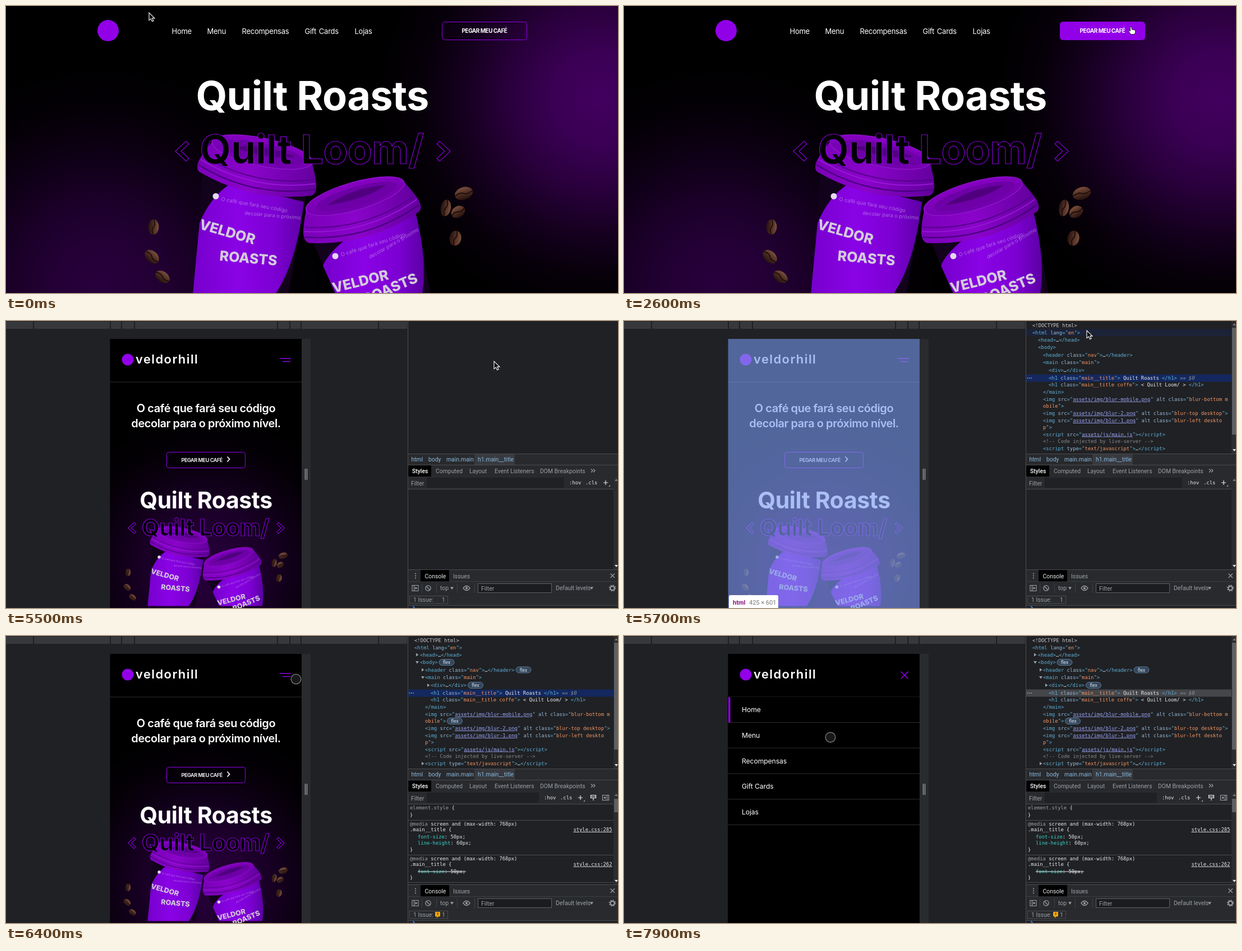
An HTML page for the animation above (8000 ms loop, 1091x513 px).

```html
<!DOCTYPE html>
<html lang="pt">
<head>
<meta charset="utf-8">
<title>Quilt Roasts</title>
<style>
html, body { margin: 0; width: 100%; height: 100%; overflow: hidden; background: #000; }
svg { display: block; width: 1091px; height: 513px; }
text { font-family: Inter, sans-serif; white-space: pre; }
.r { font-family: Roboto, sans-serif; }
.m { font-family: "DejaVu Sans Mono", monospace; }
.mid { text-anchor: middle; }
.big { font-weight: 700; letter-spacing: -.01em; text-anchor: middle; }
.nav { letter-spacing: -.25px; word-spacing: 1.5px; }
.line { fill: #000; stroke: #8500d6; stroke-width: 1.2px; vector-effect: non-scaling-stroke; }
</style>
</head>
<body>
<svg id="stage" viewBox="0 0 1091 513"></svg>
<script>
const LOOP = 8000, STEP = 100;
const PURPLE = '#9200e8', TAG = '#5db0d7', ATTR = '#9bbbdc', VALUE = '#f29766', LINK = '#9aa5f5';
const GREY = '#9aa0a6', LIGHT = '#e8eaed', RULE = '#494c50';
const TITLE = 'Quilt Roasts', CODE = 'Quilt Loom/', BRAND = 'veldorhill';

const esc = s => s.replace(/&/g, '&amp;').replace(/</g, '&lt;').replace(/>/g, '&gt;');
const rect = (x, y, w, h, fill, more = '') =>
  `<rect x="${x}" y="${y}" width="${w}" height="${h}" fill="${fill}" ${more}/>`;
const rich = (x, y, size, fill, body, more = '') =>
  `<text x="${x}" y="${y}" font-size="${size}" fill="${fill}" ${more}>${body}</text>`;
const text = (x, y, size, fill, s, more) => rich(x, y, size, fill, esc(s), more);
const path = (d, fill, more = '') => `<path d="${d}" fill="${fill}" ${more}/>`;
const stroke = (d, colour, w = 1, more = '') =>
  path(d, 'none', `stroke="${colour}" stroke-width="${w}" ${more}`);
const dot = (x, y, r, fill, more = '') => `<circle cx="${x}" cy="${y}" r="${r}" fill="${fill}" ${more}/>`;
const move = (tf, body) => `<g transform="${tf}">${body}</g>`;
const during = (from, to, body) => `<g data-from="${from}" data-to="${to}">${body}</g>`;
const fades = stops => stops.map(([at, c, a = 1]) =>
  `<stop offset="${at}" stop-color="${c}" stop-opacity="${a}"/>`).join('');
const linear = (id, stops, dir = '') => `<linearGradient id="${id}" ${dir}>${fades(stops)}</linearGradient>`;
// Soft round light with a bell-shaped falloff
const glow = (id, x, y, r, colour) =>
  `<radialGradient id="${id}" gradientUnits="userSpaceOnUse" cx="${x}" cy="${y}" r="${r}">${
    fades([0, .2, .4, .6, .8, 1].map(p => [p, colour, (Math.cos(Math.PI * p) + 1) / 2]))}</radialGradient>`;

const defs = `<defs>
  ${glow('glowR', 1060, 165, 400, '#41005e')}
  ${glow('glowL', 170, 500, 400, '#28003c')}
  ${glow('glowM', 356, 440, 280, '#260039')}
  ${linear('lid', [[0, '#7a00b8'], [.45, '#8a04ca'], [1, '#62009c']])}
  ${linear('top', [[0, '#8600c2'], [1, '#7000ac']], 'x2="0" y2="1"')}
  ${linear('panel', [[0, '#7600cc'], [.4, '#8a03e6'], [.75, '#7c00d2'], [1, '#5c00a4']])}
  ${linear('bean', [[0, '#7b4f3d'], [.5, '#4d2d22'], [1, '#24120e']], 'x2="0" y2="1"')}
  <clipPath id="phone">${rect(185.5, 32, 341.5, 481, '#000')}</clipPath>
</defs>`;

// Cups and beans
const lid = (x, y, turn) => move(`translate(${x} ${y}) rotate(${turn})`,
  path('M-107 -8Q-110 8 -102 12Q0 46 102 12Q110 8 107 -8Q103 -22 91 -46H-91Q-103 -22 -107 -8Z', 'url(#lid)') +
  stroke('M-106 0Q0 38 106 0', '#4c0080', 2.5) +
  stroke('M-104 -10Q0 26 104 -10', '#9616d6', 2) +
  stroke('M-101 -17Q0 18 101 -17', '#56008c', 2) +
  '<ellipse cy="-46" rx="91" ry="25" fill="url(#top)" stroke="#9418d0" stroke-width="1.2"/>' +
  '<ellipse cx="2" cy="-45" rx="75" ry="17" fill="#6d00a6"/>' +
  path('M-52 -44Q0 -62 58 -50Q20 -35 -52 -44Z', '#50007f'));
const print = (x, y, turn, size, s, heavy) => text(0, 0, size, heavy ? '#d3cbdc' : '#c9a8e8', s,
  `font-weight="${heavy ? 800 : 400}" opacity="${heavy ? 1 : .6}" transform="translate(${x} ${y}) rotate(${turn})"`);
const bean = (x, y, rx, ry, turn) => move(`translate(${x} ${y}) rotate(${turn})`,
  `<ellipse rx="${rx}" ry="${ry}" fill="url(#bean)"/>` +
  stroke(`M${-rx} 0Q${-rx / 3} -4 0 0T${rx} 0`, '#1c0c09', 1.8));
const cups =
  path('M350 296L333 515H503L536 335Z', '#12021c') +
  path('M400 318Q365 340 345 388L333 515H480Q518 460 531 350Z', 'url(#panel)') +
  lid(447, 306, 12) + dot(374, 340, 5.5, '#e4d8ee') +
  print(383, 348, 10, 9.4, 'O café que fará seu código') +
  print(425, 373, 5, 9.2, 'decolar para o próximo') +
  print(343, 398, 16, 25, 'VELDOR', 1) + print(380, 455, 5, 25, 'ROASTS', 1) +
  path('M546 418L586 515H757L729 360Z', '#12021c') +
  path('M612 412Q575 440 565 464L588 515H742Q752 450 728 362Z', 'url(#panel)') +
  lid(635, 384, -16) + dot(587, 447, 5.5, '#e4d8ee') +
  print(598, 448, -18, 9.4, 'O café que fará seu código') +
  print(649, 452, -30, 9.2, 'decolar para o próximo') +
  print(584, 513, -14, 25, 'VELDOR', 1) + print(641, 533, -23, 25, 'ROASTS', 1) +
  bean(263, 395, 13.5, 9.5, 92) + bean(260, 448, 14.5, 10, 42) + bean(279, 484, 14, 9.5, 36) +
  bean(816, 335, 16.5, 11, -18) + bean(784, 361, 15, 9, 100) +
  bean(806, 368, 13, 10, -32) + bean(801, 415, 13.5, 10.5, 100);

const chevron = (x, y, dir, k = 1) => path('M-12 0L7 -18L12 -13L-2 0L12 13L7 18Z', '#000',
  `class="line" transform="translate(${x} ${y}) scale(${k * dir} ${k})"`);

// Wide landing page
const links = [['Home', 296, 330], ['Menu', 359, 392], ['Recompensas', 421, 504],
  ['Gift Cards', 533, 593], ['Lojas', 622, 653]];
const wide = rect(0, 0, 1091, 513, '#000') +
  rect(0, 0, 1091, 513, 'url(#glowR)') + rect(0, 0, 1091, 513, 'url(#glowL)') +
  dot(182, 44, 19, PURPLE) +
  links.map(([s, x]) => text(x - .5, 49.7, 13, '#fff', s, 'class="nav"')).join('') +
  rect(777.5, 28.5, 151, 32, 'none', `id="cta" rx="5" stroke="${PURPLE}"`) +
  text(853, 48, 10, '#fff', 'PEGAR MEU CAFÉ', 'class="mid" font-weight="700" letter-spacing="-.5"') +
  cups +
  text(546, 185.5, 72, '#fff', TITLE, 'class="big"') +
  text(545, 282, 72, '#000', CODE, 'class="big line"') +
  chevron(314, 259.5, 1) + chevron(780, 259.5, -1);

// Phone-size page; k is the zoom, wrapped puts the last chevron on its own line
const phone = (k, cupsAt, wrapped) => `<g clip-path="url(#phone)">` +
  rect(185, 32, 342, 481, '#000') + rect(185, 117, 342, 396, 'url(#glowM)') +
  rect(185, 32 + 76.5 * k, 342, 1, '#2e2e30') +
  move(`translate(185.5 32) scale(${k})`, dot(31.5, 37, 10.5, PURPLE) +
    text(45.5, 44, 22, '#fff', BRAND, 'font-weight="600" letter-spacing="1.4"')) +
  move(`translate(527 32) scale(${k})`, stroke('M-39 35H-19M-34 40.5H-20', PURPLE, 1.6)) +
  move(cupsAt, cups) +
  move(`translate(356.5 32) scale(${k})`,
    text(0, 131, 20, '#fff', 'O café que fará seu código', 'class="mid" font-weight="600" letter-spacing="-.45"') +
    text(0, 158, 20, '#fff', 'decolar para o próximo nível.', 'class="mid" font-weight="600" letter-spacing="-.45"') +
    rect(-70, 202.5, 140, 28, '#050008', `rx="4" stroke="${PURPLE}"`) +
    text(-44, 220.3, 9.2, '#fff', 'PEGAR MEU CAFÉ', 'font-weight="600" letter-spacing="-.5"') +
    stroke('M38 210.5L42 215L38 219.5', '#fff', 1.7) +
    text(0, 302.5, 41, '#fff', TITLE, 'class="big"') +
    text(wrapped ? 14.6 : -1, 352, 41, '#000', CODE, 'class="big line"') +
    (wrapped ? chevron(-117, 340, 1, .55) + chevron(1.5, 388, -1, .55)
             : chevron(-132, 338, 1, .55) + chevron(133, 338, -1, .55))) + '</g>';

const menu = rect(470, 55, 57, 35, '#000') + rect(185, 109, 342, 404, '#000') +
  stroke('M493.5 63.5L506.5 76.5M506.5 63.5L493.5 76.5', PURPLE, 1.6) +
  links.map(([s], i) => text(210, 136 + i * 45.75, 12.2, '#fff', s, 'letter-spacing="-.1"') +
    rect(185, 154 + i * 45.75, 342, 1, '#2e2e30')).join('') +
  rect(186, 109.5, 3.5, 45, PURPLE);

const tooltip = name => rect(187, 490, 88, 30, '#fff', 'rx="3"') +
  text(194, 507, 11, '#881280', name, 'class="r" font-weight="700"') +
  text(223, 507, 11, '#777', '425 × 601', 'class="r"');

// Developer tools
const ui = (x, y, s, fill = GREY, more = '') => text(x, y, 10.4, fill, s, `class="r" ${more}`);
const mono = (x, y, body, fill = LIGHT) => rich(x, y + 3, 8.84, fill, body, 'class="m"');
const span = (fill, s, more = '') => `<tspan fill="${fill}" ${more}>${esc(s)}</tspan>`;
const tag = s => span(TAG, s);
const attr = (name, value, open) => span(ATTR, ' ' + name) + tag('="') +
  (name === 'src' ? span(LINK, value, 'text-decoration="underline"') : span(VALUE, value)) + (open ? '' : tag('"'));
const dots = span(LIGHT, '…');

const shell = rect(0, 0, 1091, 513, '#202124') + rect(0, 1, 715, 13, '#37383c') +
  [49, 186, 206, 229, 484, 506, 526, 664].map(x => rect(x - .8, 1, 1.8, 13, '#1c1d20')).join('') +
  rect(527, 32, 16, 481, '#2a2b2f') + stroke('M533.5 264V284M536.5 264V284', '#a5a7aa', 1.3) +
  rect(716, 0, 1, 513, RULE) +
  rect(717, 445, 374, 21, '#292a2d') + rect(717, 444, 374, 1, RULE) + rect(717, 465.5, 374, 1, RULE) +
  [451.5, 455.5, 459.5].map(y => dot(730, y, 1.1, GREY)).join('') +
  rect(739, 445, 51, 20.5, '#000') + ui(746.5, 459.5, 'Console', LIGHT) + ui(797, 459.5, 'Issues') +
  stroke('M1077.5 451.5L1085 459M1085 451.5L1077.5 459', GREY, 1.2);

const caret = (x, y) => path(`M${x} ${y}h6l-3 4.5z`, GREY);
const consoleBar = rect(717, 466.5, 374, 22, '#292a2d') +
  stroke('M724 472.5H735V482.5H724ZM727.5 472.5V482.5', GREY, 1.1) + path('M729.5 475v5l4 -2.5z', GREY) +
  stroke('M741.5 469V486M804.5 469V486M835.5 469V486M767.5 469V486', '#3e4044') +
  dot(752.5, 477.5, 4.6, 'none', `stroke="${GREY}" stroke-width="1.3"`) + stroke('M749.5 474.5L755.5 480.5', GREY, 1.3) +
  ui(774, 481, 'top') + caret(792, 475.5) +
  stroke('M815 477.5Q821 469.5 827 477.5Q821 485.5 815 477.5Z', GREY, 1.3) + dot(821, 477.5, 2, GREY) +
  rect(841.5, 469.5, 131, 16, '#1b1c1f', 'stroke="#5c5f63"') + ui(847, 481.5, 'Filter') +
  ui(980, 481, 'Default levels') + caret(1041, 475.5) +
  dot(1081, 477.5, 3.6, 'none', `stroke="${GREY}" stroke-width="2"`) +
  dot(1081, 477.5, 5.3, 'none', `stroke="${GREY}" stroke-width="1.6" stroke-dasharray="2 2.16"`) +
  rect(717, 488.5, 374, 20, '#292a2d') + rect(719.5, 491.5, 68, 13.5, 'none', `stroke="${RULE}"`) +
  ui(726, 502, '1 Issue:') + ui(777, 502, '1') + rect(717, 508, 374, 1, RULE) +
  stroke('M725 509.5L728 512L725 514.5', '#4285f4', 1.4);

const panels = rect(717, 237, 374, 41, '#292a2d') + rect(717, 237, 374, 1, RULE) +
  rect(717, 257, 374, 1, RULE) + rect(835, 238, 72, 19, '#393a3f') +
  [['html', 722.5], ['body', 753], ['main.main', 785], ['h1.main__title', 841]]
    .map(([s, x]) => ui(x, 251, s, '#86b8de')).join('') +
  rect(717, 258, 41, 20, '#000') + ui(724, 272, 'Styles', '#fff', 'font-weight="500"') +
  [['Computed', 766], ['Layout', 826], ['Event Listeners', 871], ['DOM Breakpoints', 952]]
    .map(([s, x]) => ui(x, 272, s)).join('') +
  stroke('M1043 264.5L1046 267.5L1043 270.5M1047 264.5L1050 267.5L1047 270.5', GREY, 1.2) +
  rect(717, 278, 374, 22, '#292a2d') + rect(717, 300, 374, 1, RULE) + ui(722, 293.5, 'Filter') +
  rect(1083, 279, 8, 165, '#2c2d30') + path('M1085 436h6l-3 4z', LIGHT) + path('M1085 286h6l-3 -4z', '#777');
const filterTools = x => rect(750, 280, x - 759, 18, '#202124') +
  mono(x, 289, ':hov', LIGHT) + mono(x + 29, 289, '.cls', LIGHT) +
  stroke(`M${x + 61} 289H${x + 69}M${x + 65} 285V293`, LIGHT, 1.2) + path(`M${x + 73} 293v3h-3z`, GREY);

const rows = [
  [728, 7.5, span('#c8cacc', '<!DOCTYPE html>')],
  [728, 20.5, tag('<html') + attr('lang', 'en') + tag('>')],
  [738, 33.5, tag('<head>') + dots + tag('</head>')],
  [738, 47, tag('<body>')],
  [747, 60.5, tag('<header') + attr('class', 'nav') + tag('>') + dots + tag('</header>')],
  [747, 74, tag('<main') + attr('class', 'main') + tag('>')],
  [757, 88, tag('<div>') + dots + tag('</div>')],
  [757, 101.5, tag('<h1') + attr('class', 'main__title') + tag('>') + esc(` ${TITLE} `) + tag('</h1>') +
    span('#8d9299', ' == $0', 'font-style="italic"')],
  [757, 114, tag('<h1') + attr('class', 'main__title coffe') + tag('>') + esc(` < ${CODE} > `) + tag('</h1>')],
  [747, 127, tag('</main>')],
  [747, 140, tag('<img') + attr('src', 'assets/img/blur-mobile.png') + span(ATTR, ' alt') + attr('class', 'blur-bottom m', 1)],
  [747, 152, span(VALUE, 'obile') + tag('">')],
  [747, 165, tag('<img') + attr('src', 'assets/img/blur-2.png') + span(ATTR, ' alt') + attr('class', 'blur-top desktop') + tag('>')],
  [747, 178, tag('<img') + attr('src', 'assets/img/blur-1.png') + span(ATTR, ' alt') + attr('class', 'blur-left deskto', 1)],
  [747, 190, span(VALUE, 'p') + tag('">')],
  [747, 202.5, tag('<script') + attr('src', 'assets/js/main.js') + tag('></' + 'script>')],
  [747, 215, span('#898989', '<!-- Code injected by live-server -->')],
  [747, 228, tag('<script') + attr('type', 'text/javascript') + tag('>') + dots + tag('</' + 'script>')]
];
const bar = (y, fill) => rect(717, y - 6.5, 366, 13, fill);
const tree =
  during(5700, 6700, bar(102, '#14285f')) + during(6700, LOOP, bar(102, '#45464a')) +
  during(5700, 6100, bar(20.5, '#1c2338')) + during(6100, 6200, bar(47, '#1c2338')) +
  [719.5, 722.7, 725.9].map(x => dot(x, 102, .9, GREY)).join('') +
  rows.map(r => mono(...r)).join('') +
  rect(1083, 0, 8, 237, '#2c2d30') + rect(1084, 12, 7, 191, '#5f6063') +
  path('M1085 229h6l-3 4z', LIGHT) + path('M1085 8h6l-3 -4z', '#777');

const arrow = (x, y, open) => path(open ? `M${x - 3} ${y - 2}h6l-3 4.5z` : `M${x - 2} ${y - 3}v6l4.5 -3z`, GREY);
const badge = (x, y) => rect(x, y - 5.5, 27, 11, '#34465a', 'rx="5.5" stroke="#5b7894"') +
  text(x + 13.5, y + 3, 8.4, '#d4e2f0', 'flex', 'class="r mid"');
const treeMarks = arrow(733, 33.5) + arrow(733, 47, 1) + arrow(743, 60.5) + arrow(743, 74, 1) +
  arrow(753, 88) + arrow(743, 228) +
  badge(772, 47) + badge(909, 60.5) + badge(823.5, 88) + badge(786.5, 152) +
  rect(765, 493, 9, 8.5, '#f5a60a', 'rx="1"') + path('M768 501v3l3 -3z', '#f5a60a') + rect(769, 494.5, 1.2, 4, '#222');

const media = y => mono(720, y, span(GREY, '@media') + esc(' screen and (max-width: 768px)'));
const prop = (y, name, value) => mono(734, y, span('#35d4c7', name) + esc(`: ${value};`));
const file = (y, n) => rich(1080.5, y + 3, 8.84, LIGHT, 'style.css:' + n, 'class="m" text-anchor="end" text-decoration="underline"');
const styles = filterTools(959) +
  stroke('M1042.5 284.5H1051.5V289.5H1042.5ZM1042.5 287H1051.5M1047 289.5V294', LIGHT, 1.2) +
  stroke('M1063.5 284.5H1074.5V293.5H1063.5ZM1071.5 284.5V293.5', GREY, 1.2) + path('M1069 286.5v5l-4 -2.5z', GREY) +
  mono(720, 307, span(GREY, 'element.style') + ' {') + mono(720, 320, '}') + rect(717, 329, 366, 1, RULE) +
  media(336) + mono(720, 346, '.main__title {') + file(346, 285) +
  prop(359, 'font-size', '50px') + prop(370, 'line-height', '60px') + mono(720, 382, '}') +
  rect(717, 391, 366, 1, RULE) +
  media(398) + mono(720, 408, '.main__title {') + file(408, 262) +
  prop(421, 'font-size', '50px') + rect(734, 420.7, 86, 1, LIGHT) + mono(720, 432, '}') +
  rect(717, 440, 366, 1, RULE) + rect(1084, 291, 7, 24, '#5f6063');

const pointers =
  path('M0 0V13.6L3.2 10.8L5.6 15.6L8 14.5L5.8 9.9H10Z', '#0b0b0b', 'id="arrow" stroke="#fff" stroke-width="1.1"') +
  path('M3.5 1Q5 -.5 6 1V5Q11 5 12.5 7V10Q12 12 11 13.5H4.5Q2.5 10.5 .5 8Q.5 6 3.5 8Z', '#fff', 'id="hand" stroke="#111" stroke-width=".8"') +
  dot(0, 0, 8.8, 'rgba(70,70,70,.35)', 'id="touch" stroke="#77787a" stroke-width="1.4"');

const stage = document.getElementById('stage');
stage.innerHTML = defs +
  during(0, 4900, wide) +
  during(4900, LOOP, shell) +
  during(4900, 5300, phone(1.095, 'translate(61 226) scale(.54)', true)) +
  during(5300, LOOP, phone(1, 'translate(86 252) scale(.5)')) +
  during(5700, 6400, rect(185.5, 32, 341.5, 481, 'rgba(125,157,238,.65)')) +
  during(5700, 6100, tooltip('html')) + during(6100, 6400, tooltip('body')) +
  during(7000, LOOP, menu) +
  during(5300, LOOP, consoleBar) +
  during(5500, LOOP, panels) + during(5500, 6100, filterTools(1004)) +
  during(5700, LOOP, tree) + during(5900, LOOP, treeMarks) + during(6100, LOOP, styles) +
  `<g id="pointer">${pointers}</g>`;

// Pointer path: time, x, y
const keys = [
  [0, 255, 12], [100, 267, 34], [300, 267, 34], [1200, 380, 43], [1300, 391, 44], [1400, 416, 44],
  [2100, 648, 52], [2200, 700, 70], [2300, 760, 71], [2400, 830, 55], [2500, 880, 42], [2600, 899, 37],
  [4800, 899, 37], [4900, 996, 303], [5200, 996, 303], [5300, 950, 240], [5400, 950, 240],
  [5500, 870, 72], [5600, 870, 72], [5700, 825, 17], [6000, 825, 17], [6100, 770, 45],
  [6200, 525, 70], [6300, 525, 70], [6400, 517, 77], [6500, 514, 75], [6600, 514, 75],
  [6700, 511, 73], [6800, 508, 71], [7300, 508, 71], [7400, 459, 106], [7500, 459, 106],
  [7600, 420, 138], [7700, 374, 173], [7800, 374, 173], [7900, 368, 181]
];
function pointerAt(t) {
  const i = keys.findIndex(k => k[0] >= t);
  if (i < 1) return keys[i < 0 ? keys.length - 1 : 0].slice(1);
  const [a, x, y] = keys[i - 1], [b, u, v] = keys[i], p = (t - a) / (b - a);
  return [x + (u - x) * p, y + (v - y) * p];
}
const overLink = ([x, y], [, left, right]) => x >= left && x <= right && y > 36 && y < 56;
const overButton = ([x, y]) => x > 777 && x < 929 && y > 28 && y < 61;

const $ = id => document.getElementById(id);
const timed = [...stage.querySelectorAll('[data-from]')];
const navs = [...stage.querySelectorAll('.nav')];
const show = (el, on) => { el.style.display = on ? '' : 'none'; };
let last = -1;

function draw() {
  const t = Math.floor(performance.now() % LOOP / STEP) * STEP;
  if (t !== last) {
    last = t;
    for (const el of timed) show(el, t >= +el.dataset.from && t < +el.dataset.to);
    const at = pointerAt(t), before = pointerAt(Math.max(0, t - STEP));
    const onPage = t < 4900, touch = t >= 6200;
    navs.forEach((el, i) => el.setAttribute('fill',
      overLink(at, links[i]) || overLink(before, links[i]) ? PURPLE : '#fff'));
    $('cta').setAttribute('fill', onPage && overButton(at) ? PURPLE : 'none');
    const hand = onPage && (overButton(at) || links.some(l => overLink(at, l)));
    show($('hand'), hand);
    show($('touch'), touch);
    show($('arrow'), !hand && !touch);
    $('pointer').setAttribute('transform', `translate(${at})`);
  }
  requestAnimationFrame(draw);
}
draw();
</script>
</body>
</html>
```
